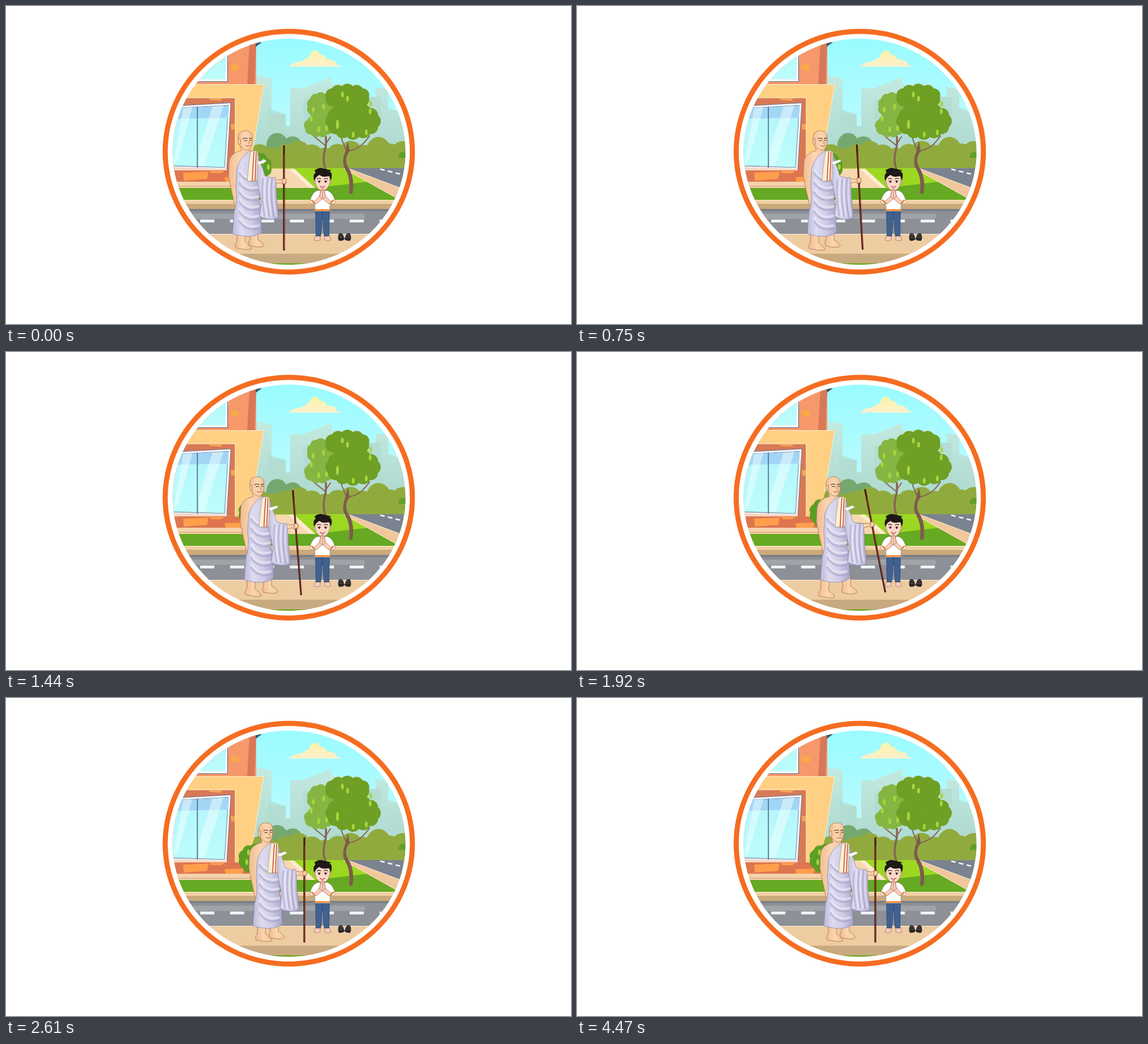
Recreate the animation shown at these times as an HTML page. Size 998 px wide and 561 px high, loop 4.5 s.

```html
<!DOCTYPE html>
<html lang="en">
<head>
<meta charset="utf-8">
<title>Street greeting</title>
<style>
html, body { margin: 0; width: 100%; height: 100%; overflow: hidden; background: #fff; }
svg { display: block; width: 100vw; height: 100vh; }
.line { fill: none; stroke-linecap: round; stroke-linejoin: round; }
.skin { fill: url(#skin); stroke: #a96f49; stroke-width: .8; stroke-linejoin: round; }
.kid { fill: #f9cdb8; stroke: #8d5147; stroke-width: .6; }
.cloth { stroke: #827ba8; stroke-width: .7; }
</style>
</head>
<body>
<svg viewBox="0 0 998 561" preserveAspectRatio="none">
<defs>
  <clipPath id="port"><ellipse cx="500" cy="257" rx="205.5" ry="199.5"/></clipPath>
  <linearGradient id="sky" x2="0" y2="1"><stop stop-color="#98fbff"/><stop offset=".6" stop-color="#b4fbff"/><stop offset="1" stop-color="#dcfbfb"/></linearGradient>
  <linearGradient id="city" x2="0" y2="1"><stop stop-color="#c3eae0"/><stop offset="1" stop-color="#a9d5cb"/></linearGradient>
  <linearGradient id="glass" x2="0" y2="1"><stop stop-color="#b4f4fc"/><stop offset="1" stop-color="#bcfefb"/></linearGradient>
  <linearGradient id="cloud" x2="0" y2="1"><stop stop-color="#fdf3a8"/><stop offset="1" stop-color="#fdf0cf"/></linearGradient>
  <linearGradient id="skin"><stop stop-color="#f0bd92"/><stop offset=".5" stop-color="#fbd6b0"/><stop offset="1" stop-color="#f3c49b"/></linearGradient>
  <linearGradient id="robe"><stop stop-color="#bdb8da"/><stop offset=".3" stop-color="#dedcf0"/><stop offset=".65" stop-color="#cfcce6"/><stop offset="1" stop-color="#aaa5c9"/></linearGradient>
  <filter id="soft" x="-20%" y="-20%" width="140%" height="140%"><feGaussianBlur stdDeviation="1.2"/></filter>
</defs>

<ellipse cx="499.5" cy="257" rx="218.3" ry="212.3" fill="none" stroke="#f66c20" stroke-width="9"/>

<g clip-path="url(#port)">
  <rect x="290" y="50" width="420" height="240" fill="url(#sky)"/>
  <path d="M499 107Q504 102 513 99Q525 98 529 93L535 90Q538 79 546 79Q553 79 554 86Q564 85 566 94Q584 95 584 103L594 107Z" fill="url(#cloud)"/>
  <path d="M436 122H445L469 128V190L494 191V212H502V145H525L575 125V138H625V160H653V143L675 147V180L706 190V290H436Z" fill="url(#city)"/>
  <path d="M463 181L494 191V290H463ZM525 165L575 160V290H525ZM630 160H662V290H630Z" fill="#b2dcd1" opacity=".75"/>
  <g id="shrubs"></g>

  <rect x="290" y="286" width="420" height="36" fill="#9cd722"/>
  <path d="M290 321H545L640 310L710 338V344H290Z" fill="#66a922"/>
  <path d="M450 287H509L546 321H430V305Z" fill="#f8d8b0"/>
  <path d="M509 287L546 321H537L499 287Z" fill="#fdebd2"/>
  <path d="M597 286H710V326Z" fill="#7b8390"/>
  <path d="M597 287H606L710 326V350Z" fill="#f1c79c" stroke="#fff0d8"/>
  <path class="line" d="M662 288L698 297" stroke="#f4f8fa" stroke-width="2.6" stroke-dasharray="6 8"/>

  <path d="M335 57H442V140H318Z" fill="#f7986b"/>
  <path d="M430 67L442 60L439 139H426Z" fill="#d87857"/>
  <path d="M441 72V64H452Z" fill="#3d5868"/>
  <path d="M320 131L340 70H391L389 131Z" fill="url(#glass)" stroke="#f4f6fb" stroke-width="4"/>
  <path class="line" d="M330 133.5H391.5V82" stroke="#516480"/>
  <path d="M397 103L411 104V114L398 113ZM409 64L420 58V66L410 68Z" fill="#f6ab47"/>
  <path d="M310 139H455L437 250L429 300H404V162H300Z" fill="#ffd083"/>
  <path d="M290 162H404.5V291H290Z" fill="#d87955"/>
  <path class="line" d="M318 138.5H455L437 250M305 162H405V290" stroke="#fff0d0"/>
  <path d="M358 163H382L380 167L360 166ZM397 208H404V218H398Z" fill="#f1a654"/>
  <path id="pane" d="M290 179L395 173L388 287L290 284Z" fill="url(#glass)" stroke="#5d6885" stroke-width="5"/>
  <path d="M290 181L393 176L392 197L290 199Z" fill="#a2d6f6"/>
  <path d="M313 180L329 179L304 270L296 278ZM365 177L384 176L350 283H341V255Z" fill="#f4ffff" opacity=".5"/>
  <path d="M290 179L395 173L388 287L290 284Z" fill="none" stroke="#f3f5fc" stroke-width="3.4"/>
  <path class="line" d="M338 178V285" stroke="#50647d" stroke-width="1.6"/>
  <path d="M290 284L390 287V291H290Z" fill="#f7d9c4"/>
  <path d="M290 290H408Q424 294 430 311H290Z" fill="#df7650"/>
  <path d="M313 294L358 292L355 305L314 308ZM360 291H386L380 295H363ZM386 302L420 301L417 310H388Z" fill="#ff9f4c"/>
  <g id="bush"></g>
  <rect x="290" y="310" width="143" height="11" fill="#f5d3ac"/>
  <path d="M290 318H433" stroke="#d9aa80" stroke-width="1.5"/>

  <g id="ground"></g>
  <path class="line" d="M305 371H630" stroke="#a0a3a8" stroke-width="9"/>
  <path d="M343 379.2H690" stroke="#eff6f7" stroke-width="5" stroke-dasharray="25 27.8"/>

  <g class="line" stroke="#866454" stroke-width="2">
    <path d="M566 292Q558 275 563 255Q566 246 565 231" stroke-width="3.6"/>
    <path d="M564 246Q553 237 545 231M565 243L573 231M601 254Q594 240 590 226M602 256Q626 254 642 229"/>
  </g>
  <path d="M606 331Q609 302 599 288Q592 276 599 258L604 238L607 256Q597 268 603 282Q617 301 612 331Z" fill="#7d5a4e"/>
  <g id="trees"></g>

  <g id="shoe">
    <path d="M588 402Q592 399 595 403L598 411Q595 415 588 414Q585 409 588 402Z" fill="#292629"/>
    <path class="line" d="M589 404H594M588 408H595" stroke="#77706c" stroke-width=".8"/>
  </g>
  <use href="#shoe" transform="translate(1196 0) scale(-1 1)"/>

  <g id="boy">
    <g id="half">
      <path class="kid" d="M548 402L555 403V413Q550 416 544 413Z"/>
      <path d="M546.5 360H559V372L556 406H547.5Z" fill="#41618f" stroke="#263c62" stroke-width=".6"/>
      <path d="M559 326H549Q541 329 537 343Q536 348 541 349L545 346L546 362H559Z" fill="#fff"/>
      <path class="line" d="M549 326Q541 329 537 343Q536 348 541 349L545 346L546 358" stroke="#77716f" stroke-width=".7"/>
      <path class="line" d="M546 360H559M540 343L546 348" stroke="#ed8430" stroke-width="3"/>
      <path class="kid" d="M543 346L548 349L559 340V322Q555 325 554 335Z"/>
      <path class="line" d="M553 323L557 328" stroke="#e98442" stroke-width="1.7"/>
    </g>
    <use href="#half" transform="translate(1118 0) scale(-1 1)"/>
    <g id="boyHead">
      <ellipse class="kid" cx="559" cy="311" rx="16" ry="4"/>
      <path d="M546 302Q545 317 552 323Q559 328 566 323Q573 317 572 302L560 292Z" fill="#fbd9c7" stroke="#8d5147" stroke-width=".6"/>
      <path d="M544 308Q542 296 547 294L545 290Q552 285 558 286L575 290L571 292Q578 293 574 308L571 300Q558 303 554 298Q548 301 547 304Z" fill="#1e1817"/>
      <g id="eye" class="line" stroke="#241716">
        <path d="M549.5 305Q553 303 556 305" stroke-width="1.2"/>
        <path d="M550.5 309Q553 307 556 309" stroke-width=".8"/>
        <path d="M553.3 309.6V310.6" stroke-width="2.6"/>
      </g>
      <use href="#eye" transform="translate(1118 0) scale(-1 1)"/>
      <path class="line" d="M555 318Q559 321.5 563 318" stroke="#aa3940" stroke-width="1.2"/>
    </g>
    <path class="kid" d="M559 321Q555 325 554 337L559 341L564 337Q563 325 559 321V340"/>
  </g>

  <g id="monk">
    <path id="backLeg" class="skin" d="M408 390L423 395L422 416Q432 423 434 428Q429 431 420 429L406 427Q403 423 408 415Z"/>
    <path id="frontLeg" class="skin" d="M429 390H445V412Q454 417 456 422Q454 426 444 425L430 423Q427 418 431 410Z"/>
    <path class="skin" d="M414 247L416 255Q396 259 394 275L393 300L398 325L402 342Q402 354 412 356L416 353Q415 343 409 338L408 318L411 288L432 258L429 249Z"/>
    <g id="robe">
      <path class="cloth" d="M432 255Q443 256 447 265L449 300L447 340Q451 365 452 399Q435 412 400 402L403 362Q410 345 406 318L408 285Q414 266 432 255Z" fill="url(#robe)"/>
      <g id="folds" class="line" filter="url(#soft)"></g>
    </g>
    <path class="skin" d="M410 234Q409 220 424 220Q437 221 435 235Q436 248 429 254Q422 256 414 247Q411 246 410 234Z"/>
    <path class="skin" d="M414 235Q409 233 410 240Q411 246 414 244Z"/>
    <g class="line" stroke="#40261c">
      <path d="M419 234Q423 232 426 234M430 234Q432 232.5 434 233.5M421 237.5H425.5M430.5 237H433.5" stroke-width="1.2"/>
      <path d="M428.5 238L430.5 242L428 242.5" stroke="#b17751" stroke-width=".8"/>
      <path d="M423 246Q427 249 432 245.5" stroke="#a74c3b"/>
    </g>
    <path id="arm" class="skin" d="M462 303L484 307Q489 303 494 305Q497 309 494 314Q488 315 484 312L462 316Z"/>
    <path class="cloth" d="M441 266Q450 271 457 299Q469 305 475 302Q478 315 478 337L482 374Q466 380 448 371L451 346L443 307Z" fill="url(#robe)"/>
    <g id="pleats" class="line" filter="url(#soft)"></g>
    <path d="M432 257Q440 253 445 258L443 308L426 309Q429 275 432 257Z" fill="#f8efd3" stroke="#a58b65" stroke-width=".7"/>
    <path class="line" d="M438 257Q436 285 435 308M442 258Q441 285 440 308" stroke="#c94335" stroke-width="1.5"/>
    <path d="M443 276L457 271L460 274L447 280Z" fill="#fff" stroke="#c5c4d5" stroke-width=".6"/>
    <g id="staff" class="line">
      <path d="M491 247V430" stroke="#4a1914" stroke-width="3.2"/>
      <path d="M491.5 262V429" stroke="#984036"/>
    </g>
    <path id="fingers" class="skin" d="M488 305H494Q498 309 491 314L488 312Z"/>
  </g>
</g>
</svg>
<script>
const $ = id => document.getElementById(id);
const times = (n, make) => Array.from({ length: n }, (_, i) => make(i)).join('');
const oval = (x, y, rx, ry, fill) =>
  `<ellipse cx="${x}" cy="${y}" rx="${rx}" ry="${ry}" fill="${fill}"/>`;
const stroke = (d, color, width) => `<path d="${d}" stroke="${color}" stroke-width="${width}"/>`;

let seed = 7;
const random = () => (seed = seed * 16807 % 2147483647) / 2147483647;

// An oval crown edged with round lobes.
function crown(x, y, rx, ry, lobe, fill) {
  const n = Math.round((rx + ry) / lobe * 2.2) + 3;
  return oval(x, y, rx + lobe / 3, ry + lobe / 3, fill) + times(n, i => {
    const a = i / n * 2 * Math.PI - Math.PI / 2;
    return oval(x + rx * Math.cos(a), y + ry * Math.sin(a), lobe, lobe, fill);
  });
}

// Bright leaves scattered inside a crown.
const leaves = (n, x, y, rx, ry, fill) => times(n, i => {
  const a = i * 2.4 + random(), r = .6 + .4 * random();
  return oval(x + rx * r * Math.cos(a), y + ry * r * Math.sin(a), 2.5, 5, fill);
});

const OLIVE = '#91aa3d', LIME = '#86b542', LEAF = '#6f9f24', SHINE = '#a5d63e';

$('shrubs').innerHTML =
  times(2, i => oval(479 + 27 * i, 245 + 6 * i, 19, 21, '#75a86f')) +
  times(12, i => oval(448 + 23 * i, 264 - 6 * Math.sin(i * 1.6 - 3.2), 20, 20, OLIVE)) +
  oval(658, 260, 23, 29, OLIVE) + oval(701, 270, 8, 13, '#629e2c') +
  `<rect x="440" y="268" width="270" height="19" fill="${OLIVE}"/>`;

$('bush').innerHTML = crown(440, 284, 19, 16, 11, '#5c9d24') + leaves(5, 440, 284, 24, 18, SHINE);

$('trees').innerHTML =
  crown(556, 177, 15, 15, 10, LIME) + crown(553, 212, 17, 10, 10, LIME) +
  leaves(5, 553, 200, 20, 28, SHINE) +
  crown(603, 161, 28, 12, 12, LEAF) + crown(613, 203, 36, 20, 13, LEAF) +
  leaves(8, 613, 192, 42, 42, SHINE);

// Kerb, road and pavement, stacked downwards.
let y = 342;
$('ground').innerHTML = [[1, '#fff0d4'], [6, '#f0cfa2'], [9, '#caa97b'], [4, '#7c8087'], [40, '#8d9096'],
  [1, '#fff0d8'], [34, '#eecca1'], [17, '#c8aa80'], [8, '#6ca51d']].map(([h, fill]) =>
  `<rect x="290" y="${(y += h) - h}" width="420" height="${h + .4}" fill="${fill}"/>`).join('');

$('folds').innerHTML = times(6, i => {
  const top = 294 + 17 * i;
  const curve = dy => `M412 ${top + dy}Q424 ${top + dy + 20} 447 ${top + dy + 13}`;
  return stroke(curve(0), '#9d97c0', 1.8) + stroke(curve(-5), '#efedf9', 2.4);
});

$('pleats').innerHTML = times(3, i => {
  const x = 454 + 8 * i;
  const curve = dx => `M${x + dx} 305Q${x + dx - 4} 335 ${x + dx + 3} 371`;
  return stroke(curve(0), '#9d97c0', 1.8) + stroke(curve(4), '#efedf9', 2);
});

const LOOP = 4500, STEP = 30, WALK = 2630, REACH = 36;
const PACE = 720, FIRST = 120, LAST = FIRST + 3 * PACE;

// 0 is feet together, 1 is the widest step.
const stride = t => t < FIRST || t > LAST ? 0
  : Math.abs(Math.sin(Math.PI * (t - FIRST) / PACE)) ** 1.3;
const glide = t => REACH * (1 - Math.cos(Math.PI * Math.min(1, t / WALK))) / 2;

const move = (id, value) => $(id).setAttribute('transform', value);

function pose(t) {
  const s = stride(t);
  move('monk', `translate(${glide(t)} 0)`);
  move('backLeg', `translate(${-7 * s} ${4 * s}) rotate(${2 * s} 415 395)`);
  move('frontLeg', `translate(${8 * s} ${2 * s}) rotate(${-2 * s} 437 395)`);
  move('robe', `translate(0 260) scale(1 ${1 + .03 * s}) translate(0 -260)`);
  move('arm', `rotate(${-7 * s} 450 305)`);
  move('staff', `translate(0 ${-5 * s}) rotate(${-11.2 * s} 491 309)`);
  move('fingers', `translate(0 ${-5 * s})`);
  move('boyHead', `rotate(${.4 * Math.sin(t * Math.PI * 6 / LOOP)} 559 325)`);
}

const start = performance.now();
function tick() {
  const t = (performance.now() - start) % LOOP;
  pose(Math.floor(t / STEP) * STEP);
  requestAnimationFrame(tick);
}
tick();
</script>
</body>
</html>
```
